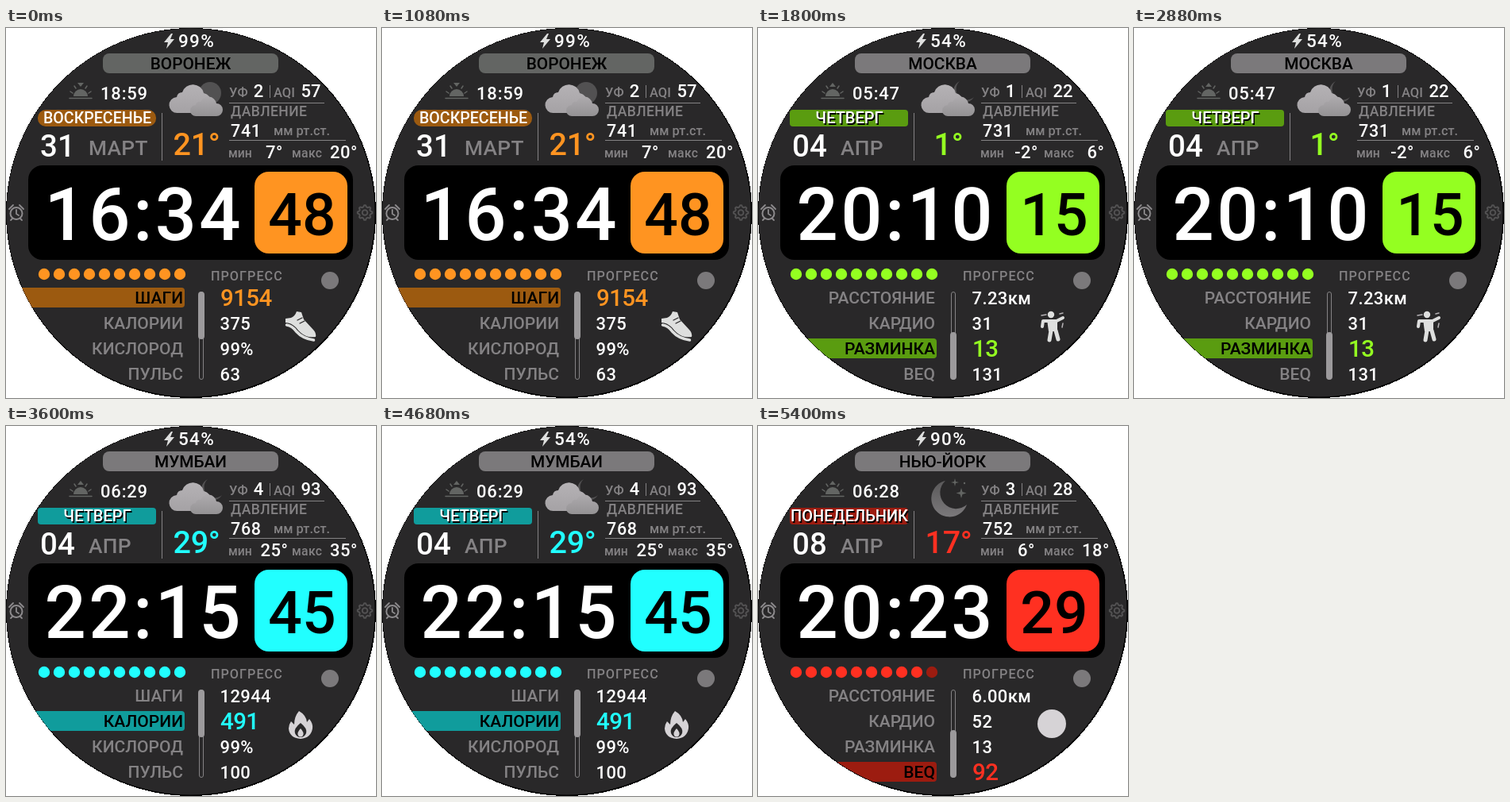
These frames come from a looping animation (466x466 px, 7200 ms). An HTML page:

```html
<!DOCTYPE html>
<html lang="ru">
<head>
<meta charset="utf-8">
<title>Циферблат</title>
<style>
html, body { margin: 0; width: 100%; height: 100%; overflow: hidden; background: #fff; }
svg { display: block; width: 466px; height: 466px; }
text { font-family: Roboto, "Noto Sans", sans-serif; white-space: pre; }
</style>
</head>
<body>
<svg id="face" viewBox="0 0 466 466"></svg>
<script>
const HOLD = 1800, GRAY = '#848284', WHITE = '#fff';
const upper = ['ШАГИ', 'КАЛОРИИ', 'КИСЛОРОД', 'ПУЛЬС'];
const lower = ['РАССТОЯНИЕ', 'КАРДИО', 'РАЗМИНКА', 'BEQ'];

const scenes = [
  { accent: '#ff9421', dim: '#9c5a10', pill: '#636563', battery: '99%', city: 'ВОРОНЕЖ', sun: '18:59', sunset: true,
    week: 'ВОСКРЕСЕНЬЕ', round: true, day: '31', month: 'МАРТ', temp: '21°', sky: 'sun', uv: '2', aqi: '57',
    press: '741', min: '7°', max: '20°', time: '16:34', sec: '48', dots: 10,
    rows: upper, values: ['9154', '375', '99%', '63'], pick: 0, icon: 'shoe' },
  { accent: '#94ff21', dim: '#5a9c10', pill: '#7b797b', battery: '54%', city: 'МОСКВА', sun: '05:47',
    week: 'ЧЕТВЕРГ', day: '04', month: 'АПР', temp: '1°', sky: 'night', uv: '1', aqi: '22',
    press: '731', min: '-2°', max: '6°', time: '20:10', sec: '15', dots: 10,
    rows: lower, values: ['7.23км', '31', '13', '131'], pick: 2, icon: 'stretch' },
  { accent: '#21ffff', dim: '#109c9c', pill: '#7b797b', battery: '54%', city: 'МУМБАИ', sun: '06:29',
    week: 'ЧЕТВЕРГ', day: '04', month: 'АПР', temp: '29°', sky: 'night', uv: '4', aqi: '93',
    press: '768', min: '25°', max: '35°', time: '22:15', sec: '45', dots: 10,
    rows: upper, values: ['12944', '491', '99%', '100'], pick: 1, icon: 'flame' },
  { accent: '#ff3021', dim: '#9c1c10', pill: '#7b797b', battery: '90%', city: 'НЬЮ-ЙОРК', sun: '06:28',
    week: 'ПОНЕДЕЛЬНИК', day: '08', month: 'АПР', temp: '17°', sky: 'moon', uv: '3', aqi: '28',
    press: '752', min: '6°', max: '18°', time: '20:23', sec: '29', dots: 9,
    rows: lower, values: ['6.00км', '52', '13', '92'], pick: 3, icon: 'badge' }
];

const text = (s, x, y, size, fill = WHITE, anchor = 'start', weight = 500, gap = 0) =>
  `<text x="${x}" y="${y}" font-size="${size}" fill="${fill}" text-anchor="${anchor}" font-weight="${weight}" letter-spacing="${gap}">${s}</text>`;
const label = (s, x, y, size, gap = 0) => text(s, x, y, size, GRAY, 'start', 500, gap);
const mid = (s, x, y, size, fill = WHITE, gap = 0) => text(s, x, y, size, fill, 'middle', 500, gap);
const box = (x, y, w, h, r, fill, more = '') => `<rect x="${x}" y="${y}" width="${w}" height="${h}" rx="${r}" fill="${fill}" ${more}/>`;
const dot = (x, y, r, fill, more = '') => `<circle cx="${x}" cy="${y}" r="${r}" fill="${fill}" ${more}/>`;
const shape = (d, fill) => `<path d="${d}" fill="${fill}"/>`;
const line = (d, color, w = 1) =>
  `<path d="${d}" fill="none" stroke="${color}" stroke-width="${w}" stroke-linecap="round" stroke-linejoin="round"/>`;
const rule = (x, y, w, h) => box(x, y, w, h, 0, GRAY);

const cloud =
  shape('M216 107a10 10 0 0 1-1-20q1-6 7-6a14 14 0 0 1 27 1q9 2 9 12v13z', 'url(#cloud)') +
  shape('M239 111a7 7 0 0 1 0-14q1-5 6-4a10.5 10.5 0 0 1 20 2a8 8 0 0 1 0 16z', 'url(#puff)');
const skies = {
  sun: dot(257, 82, 14, '#525152') + cloud,
  night: shape('M254 67a14 14 0 1 0 18 20a13 13 0 0 1-18-20z', '#525152') + cloud,
  moon: shape('M236 69a23 23 0 1 0 27 30a20 20 0 0 1-27-30z', 'url(#moon)') +
    shape('M248 66l1 4 4 1-4 1-1 4-1-4-4-1 4-1zM256 78l1.5 5 5 1.5-5 1.5-1.5 5-1.5-5-5-1.5 5-1.5z', '#636563') +
    dot(260, 72, 1.2, '#636563')
};

const icons = {
  shoe: shape('M352 366l7-1q5-2 7-8l6 1 3 9 12 13q4 4 3 9-7 1-12-1-7-3-13-11-6-6-13-6z', '#dedfde') +
    line('M353.5 374q7 1 12 8 8 9 22 11', '#dedfde', 3.5) +
    line('M367 368l6-3m-3 7 6-3', '#292829', 1.2),
  stretch: dot(369, 361, 4.2, '#dedfde') +
    shape('M364 367h13v15h-11z', '#dedfde') +
    line('M358 376l1-7h17l8-4', '#dedfde', 4) +
    line('M369 381l-2 12m8-12 3 11', '#dedfde', 5) +
    line('M357 362l6-1m17-1 4-1m0 13-1 5', '#b5b2b5', 1.5),
  flame: shape('M369 359q9 5 10 14l3-4q5 6 4 12-2 12-15 13-14-1-15-13 0-5 3-9l4 4q0-10 6-17z', '#d6d3d6') +
    shape('M371 374q9 7 7 13-2 5-7 5t-7-5q-2-6 7-13z', '#292829') +
    shape('M371 381q5 5 3 9-3 3-6 0-2-4 3-9z', '#d6d3d6'),
  badge: dot(370, 375, 18, '#d6d3d6')
};

function alarm() {
  return dot(13, 233.5, 7.5, 'none', 'stroke="#8c8a8c" stroke-width="2"') +
    line('M13 229v5l3 2M4 228l5-5m8 0 5 5M8 240l-2 2m12-2 2 2', '#8c8a8c', 1.8);
}

function gear() {
  const pts = [];
  for (let i = 0; i < 32; i++) {
    const a = (i - .5) * Math.PI / 16, r = i % 4 < 2 ? 9.2 : 7.2;
    pts.push([452 + r * Math.cos(a), 232.5 + r * Math.sin(a)].map(v => v.toFixed(1)));
  }
  return line('M' + pts.join('L') + 'z', '#525152', 2) +
    dot(452, 232.5, 3.3, 'none', 'stroke="#525152" stroke-width="2"');
}

function horizon(sunset) {
  return shape('M85 86a9 9 0 0 1 18 0z', '#636563') +
    line('M80 88.5h28M81 80l3 2m23-2-3 2M86 73l2 3m14-3-2 3', '#636563', 1.5) +
    shape(sunset ? 'M90 69h8l-4 5z' : 'M90 74h8l-4-5z', '#636563');
}

function weekday(s) {
  const pill = box(40, 103, 149, 21, s.round ? 10 : 4, s.dim);
  const shadow = s.round ? '' : mid(s.week, 116.5, 121.5, 20, '#000');
  return pill + shadow + mid(s.week, 115, 120, s.round ? 19.6 : 20);
}

function weather(s) {
  return skies[s.sky] + text(s.temp, 240, 160, 39.5, s.accent, 'middle', 500, -.3) +
    label('УФ', 281, 87, 16.5) + mid(s.uv, 318, 87, 22) + rule(332, 72, 1, 16) +
    label('AQI', 337, 87, 16.5) + mid(s.aqi, 384, 87, 22) + rule(281, 94, 120, 1) +
    label('ДАВЛЕНИЕ', 283, 111, 17.5, .4) +
    text(s.press, 283, 136.5, 21.5, WHITE, 'start', 500, .7) + label('мм рт.ст.', 337, 135, 16.3) + rule(281, 141, 147, 1) +
    label('мин', 280, 163, 15.7) + mid(s.min, 338, 164, 22, WHITE, .5) +
    label('макс', 360, 163, 15.7, .3) + mid(s.max, 425.5, 164, 22, WHITE, .5);
}

function progress(s) {
  let out = '';
  for (let i = 0; i < 10; i++) out += dot(48 + 19 * i, 310, 7.2, i < s.dots ? s.accent : s.dim);
  out += label('ПРОГРЕСС', 258, 318, 16.2, 1) + dot(408, 318, 11, '#7b797b');
  out += box(0, 327 + 32 * s.pick, 225, 25, 4, s.dim, 'clip-path="url(#disc)"');
  s.rows.forEach((name, i) => {
    const y = 347 + 32 * i, on = i === s.pick;
    out += text(name, 223, y, 21, on ? '#000' : GRAY, 'end', 500);
    out += on ? text(s.values[i], 270, y + 3, 29.5, s.accent, 'start', 500, -.6)
              : text(s.values[i], 269.5, y + 1, 22, WHITE, 'start', 500, .4);
  });
  return out + box(243.5, 332.5, 5, 110, 2.5, 'none', 'stroke="#848284"') +
    box(242, s.rows === upper ? 332 : 383, 8, 60, 4, '#9c9a9c') + icons[s.icon];
}

const stops = (id, a, b) =>
  `<linearGradient id="${id}" x1="0" y1="0" x2="0" y2="1"><stop stop-color="${a}"/><stop offset="1" stop-color="${b}"/></linearGradient>`;
const defs = '<defs><clipPath id="disc"><circle cx="232.5" cy="232.5" r="232.5"/></clipPath>' +
  stops('cloud', '#b5b2b5', '#a5a2a5') + stops('puff', '#adaaad', '#949294') + stops('moon', '#5a595a', '#7b797b') + '</defs>';

function draw(s) {
  return defs + dot(233, 233, 233, '#000', 'shape-rendering="crispEdges"') + dot(232.5, 232.5, 232, '#292829') +
    shape('M208 7l-9 11h5l-2 8 10-12h-5l3-7z', '#dedfde') + text(s.battery, 217, 24, 22.5, WHITE, 'start', 500, 1.3) +
    box(122, 32, 221, 25, 8, s.pill) + mid(s.city, 232.5, 52, 20.8, '#000') +
    horizon(s.sunset) + mid(s.sun, 149, 90, 22, WHITE, .8) + weekday(s) +
    text(s.day, 43, 162, 38.5) + label(s.month, 104, 159.5, 26.3, .3) + rule(196, 107, 1, 60) +
    weather(s) + alarm() + gear() +
    box(28, 173, 409, 119, 18, '#000') + text(s.time, 48.5, 267, 92, WHITE, 'start', 500, 3.4) +
    box(313, 181, 117, 103, 18, s.accent) + mid(s.sec, 373, 261, 75, '#000') +
    progress(s);
}

const face = document.getElementById('face');
let start, shown = -1;

function tick(now) {
  start ??= now;
  const i = Math.floor((now - start) / HOLD) % scenes.length;
  if (i !== shown) {
    face.innerHTML = draw(scenes[i]);
    shown = i;
  }
  requestAnimationFrame(tick);
}
requestAnimationFrame(tick);
</script>
</body>
</html>
```
